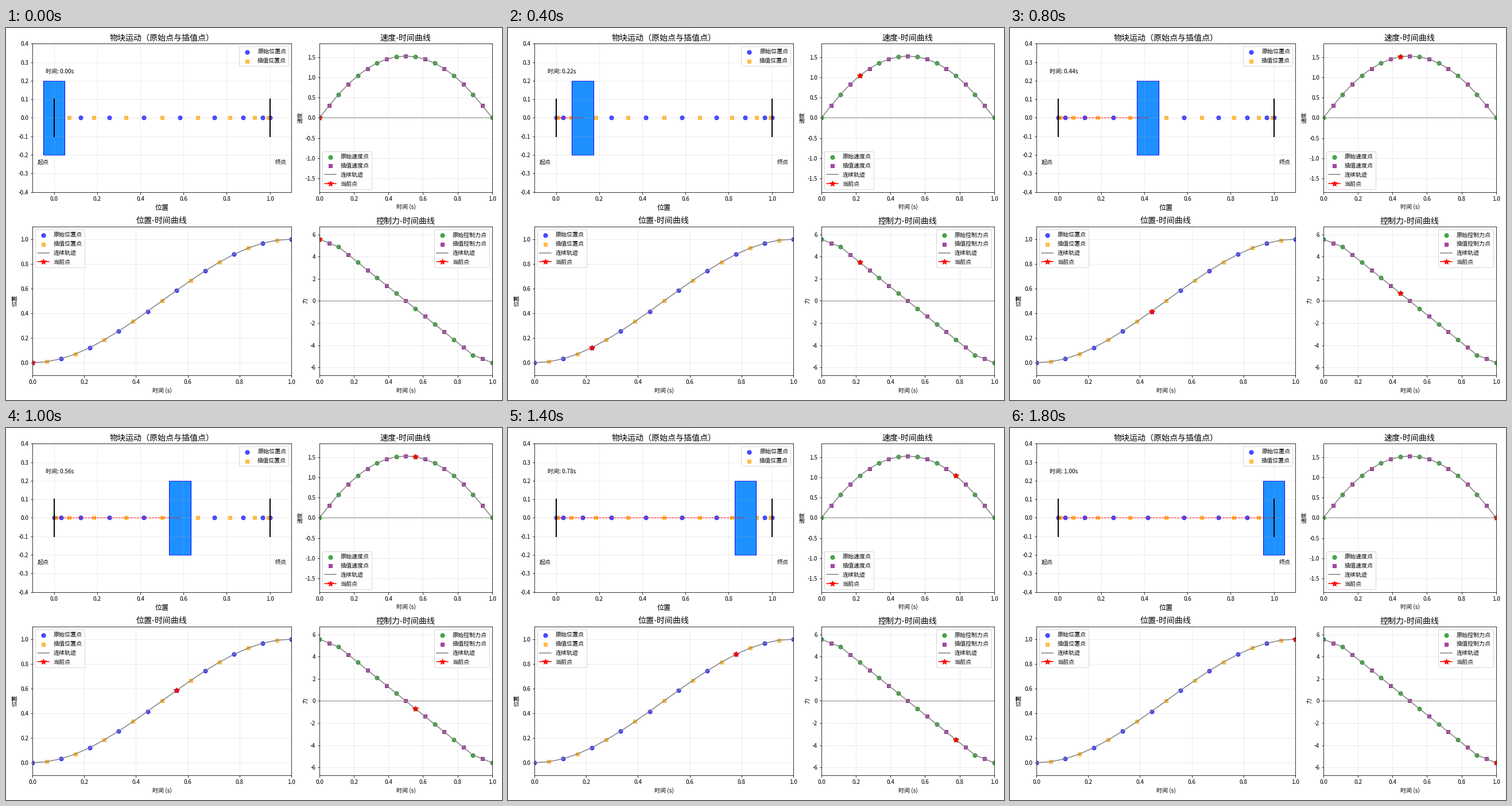
Recreate the animation shown at these times as a matplotlib script. Size 864 px wide and 648 px high, loop 1.9 s.

```python
import matplotlib.pyplot as plt
import numpy as np
from matplotlib.animation import FuncAnimation
from matplotlib.patches import Rectangle
from matplotlib.ticker import MultipleLocator

plt.rcParams.update({
    "font.family": "Noto Sans CJK JP",
    "font.size": 10,
    "axes.unicode_minus": False,
    "legend.labelspacing": 0.58,
})

W, H, DPI = 864, 648, 72
N = 9          # collocation intervals
STEP = 1 / N


def solve():
    """Minimum-effort move from 0 to 1 with trapezoidal collocation."""
    u = np.array([8, 7, 5, 3, 1, -1, -3, -5, -7, -8], float)

    def integrate(f):
        return np.r_[0, np.cumsum((f[1:] + f[:-1]) * STEP / 2)]

    v = integrate(u)
    x = integrate(v)
    return x / x[-1], v / x[-1], u / x[-1]


def with_midpoints(y, slope=None):
    """Insert interval midpoints: linear, or quadratic when a slope is given."""
    out = np.empty(2 * N + 1)
    out[::2] = y
    out[1::2] = (y[1:] + y[:-1]) / 2
    if slope is not None:
        out[1::2] -= (slope[1:] - slope[:-1]) * STEP / 8
    return out


x, v, u = solve()
t = np.linspace(0, 1, 2 * N + 1)
pos = with_midpoints(x, v)
vel = with_midpoints(v, u)
force = with_midpoints(u)

fig = plt.figure(figsize=(W / DPI, H / DPI), dpi=DPI)

# Panel layout in pixels
LEFT, RIGHT, TOP, LOW = 46.0, 546.0, 27.35, 346.4
WIDE, NARROW, TALL = 451.2, 300.8, 258.2


def add_axes(left, top, width, title, xlim, ylim, ticks, xlabel, size=10):
    ax = fig.add_axes([left / W, 1 - (top + TALL) / H, width / W, TALL / H])
    ax.set_title(title, fontsize=14)
    ax.set_xlabel(xlabel, fontsize=size)
    ax.set(xlim=xlim, ylim=ylim)
    ax.xaxis.set_major_locator(MultipleLocator(0.2))
    ax.yaxis.set_major_locator(MultipleLocator(ticks))
    ax.grid(True, alpha=0.3)
    return ax


def add_points(ax, px, py, name, colors):
    ax.scatter(px[::2], py[::2], s=50, c=colors[0], alpha=0.7,
               label=f"原始{name}点")
    ax.scatter(px[1::2], py[1::2], s=30, c=colors[1], marker="s", alpha=0.7,
               label=f"插值{name}点")


def add_curve(ax, y, name, ylabel, colors, loc, zero_line=True):
    add_points(ax, t, y, name, colors)
    ax.plot(t, y, color="gray", lw=1.5, label="连续轨迹")
    star, = ax.plot([], [], "r*-", markersize=10, label="当前点")
    if zero_line:
        ax.axhline(0, color="gray", lw=1)
    ax.set_ylabel(ylabel)
    ax.legend(loc=loc)
    return star


BLUES, GREENS = ("blue", "orange"), ("green", "purple")
vmax, umax = 1.2 * vel.max(), 1.2 * force.max()

ax_move = add_axes(LEFT, TOP, WIDE, "物块运动（原始点与插值点）",
                   (-0.1, 1.1), (-0.4, 0.4), 0.1, "位置", 12)
ax_vel = add_axes(RIGHT, TOP, NARROW, "速度-时间曲线",
                  (0, 1), (-vmax, vmax), 0.5, "时间 (s)")
ax_pos = add_axes(LEFT, LOW, WIDE, "位置-时间曲线",
                  (0, 1), (-0.1, 1.1), 0.2, "时间 (s)")
ax_force = add_axes(RIGHT, LOW, NARROW, "控制力-时间曲线",
                    (0, 1), (-umax, umax), 2, "时间 (s)")

# Moving block
add_points(ax_move, pos, np.zeros_like(pos), "位置", BLUES)
block = ax_move.add_patch(
    Rectangle((-0.05, -0.2), 0.1, 0.4, fc="dodgerblue", ec="blue", lw=1))
trail, = ax_move.plot([], [], "r--", lw=1)
for end, name in ((0, "起点"), (1, "终点")):
    ax_move.plot([end, end], [-0.1, 0.1], "k-", lw=2)
    ax_move.text(end + (0.05 if end else -0.05), -0.25, name, ha="center")
clock = ax_move.text(0.05, 0.8, "", transform=ax_move.transAxes)
ax_move.legend(loc="upper right")

# Curves with their current-point stars
stars = [
    (add_curve(ax_vel, vel, "速度", "速度", GREENS, "lower left"), vel),
    (add_curve(ax_pos, pos, "位置", "位置", BLUES, "upper left", False), pos),
    (add_curve(ax_force, force, "控制力", "力", GREENS, "upper right"), force),
]


def update(i):
    block.set_x(pos[i] - 0.05)
    trail.set_data(pos[:i + 1], np.zeros(i + 1))
    clock.set_text(f"时间: {t[i]:.2f}s")
    for star, y in stars:
        star.set_data([t[i]], [y[i]])
    return [block, trail, clock] + [star for star, _ in stars]


anim = FuncAnimation(fig, update, frames=len(t), interval=100,
                     repeat=True, repeat_delay=0, blit=False)
plt.show()
```
